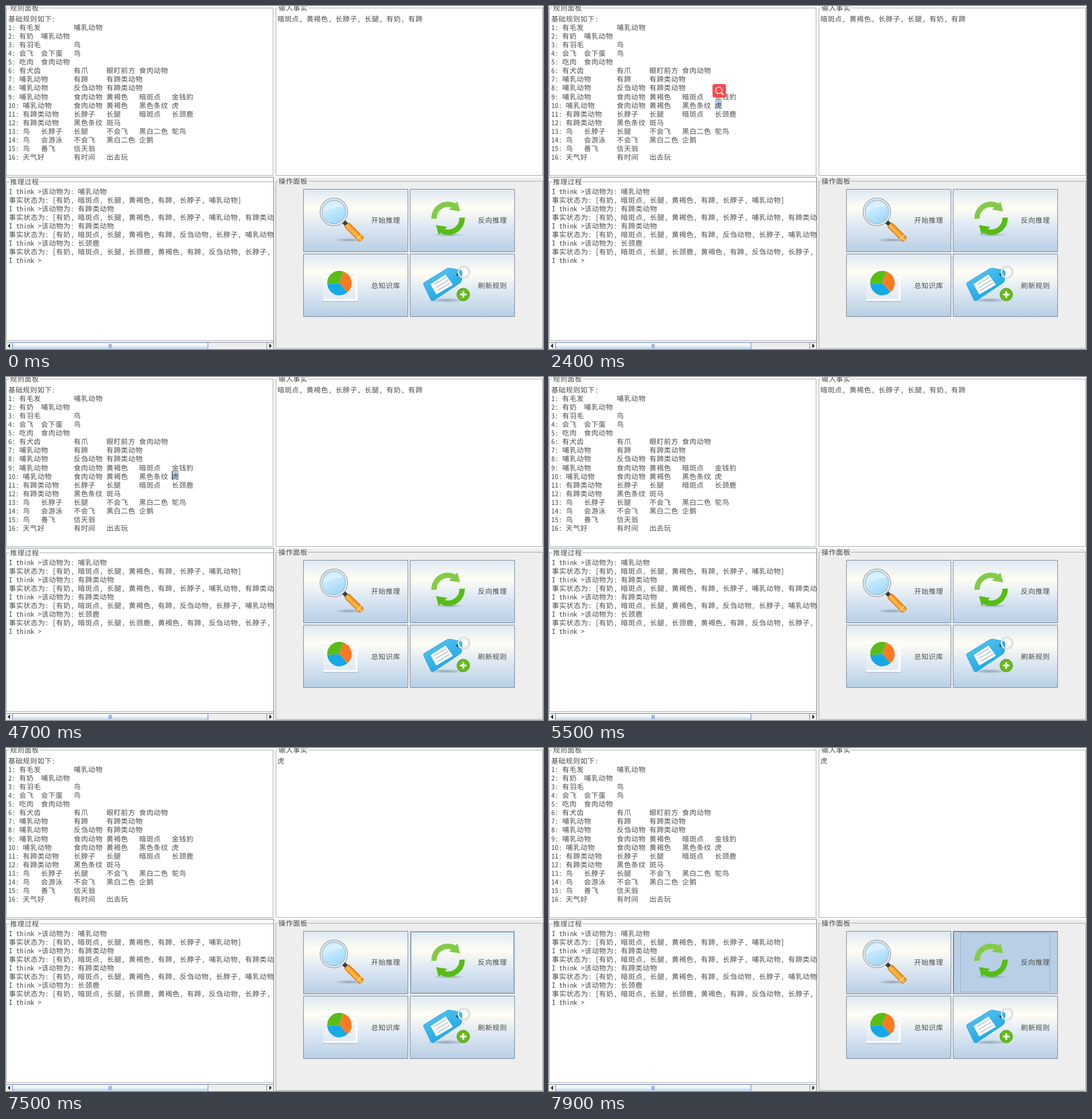
Write an HTML page that moves like this. It is 936x598 px and loops after 8 s.

```html
<!DOCTYPE html>
<html lang="zh-CN">
<head>
<meta charset="utf-8">
<title>动物识别推理</title>
<style>
  html, body { margin: 0; width: 100%; height: 100%; overflow: hidden; background: #fff; }
  svg { display: block; }
  text {
    font: 12.2px "Noto Sans Mono CJK SC", "Noto Sans CJK SC", "Noto Sans CJK", "Noto Sans Mono", monospace;
    fill: #4c4c4c; white-space: pre; text-rendering: geometricPrecision;
  }
  .frame { fill: none; stroke: #a8a8a8; }
  .edge { fill: none; stroke: #7a8a99; }
  .sel { fill: #b8cfe5; }
  .caret { fill: #333; }

  /* 1.25% of the loop is 100 ms */
  .timed { opacity: 0; animation: 8s step-end infinite; }
  #caretEnd { animation-name: caretEnd; }
  #caretSel { animation-name: caretSel; }
  #ruleSel { animation-name: ruleSel; }
  #popup { animation-name: popup; }
  #caretOld { animation-name: caretOld; }
  #inputSel { animation-name: inputSel; }
  #oldFacts { animation-name: oldFacts; }
  #newFacts { animation-name: newFacts; }
  #caretNew { animation-name: caretNew; }
  #hover { animation-name: hover; }
  #pressed { animation-name: pressed; }

  @keyframes caretEnd { 0% { opacity: 0 } 15% { opacity: 1 } 21.25% { opacity: 0 } }
  @keyframes ruleSel { 0% { opacity: 0 } 25% { opacity: 1 } 62.5% { opacity: 0 } }
  @keyframes caretSel {
    0%, 30%, 41.25%, 52.5%, 62.5% { opacity: 0 }
    25%, 36.25%, 47.5%, 58.75% { opacity: 1 }
  }
  @keyframes popup {
    0% { opacity: 0 } 30% { opacity: .96 } 33.75% { opacity: .91 } 37.5% { opacity: .83 }
    41.25% { opacity: .76 } 43.75% { opacity: .69 } 47.5% { opacity: .61 }
    51.25% { opacity: .54 } 58.75% { opacity: 0 }
  }
  @keyframes caretOld { 0% { opacity: 0 } 62.5% { opacity: 1 } 68.75% { opacity: 0 } }
  @keyframes inputSel { 0% { opacity: 0 } 72.5% { opacity: 1 } 75% { opacity: 0 } }
  @keyframes oldFacts { 0% { opacity: 1 } 75% { opacity: 0 } }
  @keyframes newFacts { 0% { opacity: 0 } 75% { opacity: 1 } }
  @keyframes caretNew {
    0%, 80%, 92.5%, 98.75% { opacity: 0 }
    75%, 86.25%, 97.5% { opacity: 1 }
  }
  @keyframes hover { 0% { opacity: 0 } 93.75% { opacity: 1 } 98.75% { opacity: 0 } }
  @keyframes pressed { 0% { opacity: 0 } 98.75% { opacity: 1 } }
</style>
</head>
<body>
<svg width="936" height="598" viewBox="0 0 936 598">
  <defs>
    <linearGradient id="ocean" x2="0" y2="1">
      <stop stop-color="#dde8f3"/><stop offset=".3" stop-color="#fffdf4"/>
      <stop offset=".6" stop-color="#dde8f3"/><stop offset="1" stop-color="#b8cfe5"/>
    </linearGradient>
    <linearGradient id="glass" x2=".5" y2="1">
      <stop stop-color="#a9dcfa"/><stop offset=".5" stop-color="#c5e9fd"/><stop offset="1" stop-color="#9fd8f8"/>
    </linearGradient>
    <linearGradient id="orange" x2="1" y2="0">
      <stop stop-color="#f08a12"/><stop offset=".4" stop-color="#ffc052"/><stop offset="1" stop-color="#ee7d08"/>
    </linearGradient>
    <linearGradient id="tagBlue" x2=".6" y2="1">
      <stop stop-color="#5cc9f5"/><stop offset="1" stop-color="#1ba3e2"/>
    </linearGradient>
    <radialGradient id="shade">
      <stop stop-color="#56687a" stop-opacity=".5"/><stop offset="1" stop-color="#56687a" stop-opacity="0"/>
    </radialGradient>
    <clipPath id="logClip"><path d="M0 300H466V583H0z"/></clipPath>
    <g id="button">
      <path fill="url(#ocean)" d="M0 0H182V109H0z"/>
      <path class="edge" d="M.5 .5H182.5V109.5H.5z"/>
    </g>
    <g id="arrow">
      <path d="M746 371A24.5 24.5 0 0 1 781 348" fill="none" stroke-width="9.5"/>
      <path d="M787 341L791.5 358L772 355z" stroke="none"/>
    </g>
  </defs>

  <!-- panels -->
  <path fill="#eee" d="M467 299H936V598H467z"/>
  <path class="frame" d="M6 3.5H.5V295.5H465.5V3.5H58M474 3.5H470.5V295.5H935.5V3.5H526"/>
  <path class="frame" d="M6 306.5H.5V583.5H466M58 306.5H466M474 305.5H470.5V597H935.5V305.5H526"/>

  <!-- scroll bar -->
  <path fill="#eee" d="M0 586H466V598H0z"/>
  <path class="edge" d="M0 586.5H466M454.5 587V598M0 298.5H466.5V598"/>
  <path fill="url(#ocean)" stroke="#6382bf" d="M11.5 586.5H352V599H11.5z"/>
  <path stroke="#6382bf" d="M179.5 589V596M181.5 589V596M183.5 589V596"/>
  <path fill="#222" d="M3 592.5L7 588.5V596.5zM463 592.5L459 588.5V596.5z"/>

  <!-- highlights -->
  <path class="sel timed" id="ruleSel" d="M289 164H301.5V179H289z"/>
  <path class="sel timed" id="inputSel" d="M473 13H727V29H473z"/>

  <g id="texts"></g>
  <g id="log" clip-path="url(#logClip)"></g>
  <g class="timed" id="oldFacts"></g>
  <g class="timed" id="newFacts"></g>

  <path class="caret timed" id="caretEnd" d="M301 164h1v15h-1z"/>
  <path class="caret timed" id="caretSel" d="M289 164h1v15h-1z"/>
  <path class="caret timed" id="caretOld" d="M726 13h1v16h-1z"/>
  <path class="caret timed" id="caretNew" d="M485 13h1v16h-1z"/>

  <g class="timed" id="popup">
    <rect x="285" y="136" width="23.5" height="23.5" rx="3.5" fill="#f94548"/>
    <path d="M300 151L303.5 154.5" stroke="#fff" stroke-width="2" stroke-linecap="round"/>
    <circle cx="296" cy="147" r="5.6" fill="none" stroke="#fff" stroke-width="1.4"/>
  </g>

  <!-- buttons -->
  <use href="#button" x="518" y="319"/>
  <use href="#button" x="704" y="319"/>
  <use href="#button" x="518" y="432"/>
  <use href="#button" x="704" y="432"/>
  <g class="timed" id="hover">
    <path fill="none" stroke="#b8cfe5" stroke-width="3" d="M705.5 320.5H885.5V427.5H705.5z"/>
    <path class="edge" d="M705.5 320.5H885.5V427.5H705.5z"/>
  </g>
  <g class="timed" id="pressed">
    <path fill="#b8cfe5" stroke="#7a8a99" d="M704.5 319.5H886.5V428.5H704.5z"/>
    <path class="edge" d="M705.5 428V320.5H886"/>
    <path fill="none" stroke="#9db2c8" d="M717.5 322.5H873.5V425.5H717.5z"/>
  </g>

  <!-- magnifier -->
  <ellipse cx="598" cy="408" rx="27" ry="3.5" fill="url(#shade)"/>
  <g transform="translate(571.5 359) rotate(-45)">
    <rect x="-3.5" y="24" width="7" height="9" fill="#3c3c3c"/>
    <rect x="-5.5" y="31" width="11" height="38" rx="3" fill="url(#orange)" stroke="#c96c0a" stroke-width=".8"/>
    <path d="M-5.5 62H5.5" stroke="#ffe2a8" stroke-width="1.5"/>
  </g>
  <circle cx="571.5" cy="359" r="22.5" fill="url(#glass)" stroke="#8d959c" stroke-width="4.4"/>
  <circle cx="571.5" cy="359" r="22.3" fill="none" stroke="#e4e9ed" stroke-width="2.8"/>
  <path d="M553 360A18.5 18.5 0 0 1 587 349Q570 350 553 360z" fill="#fff" opacity=".4"/>

  <!-- refresh -->
  <ellipse cx="772" cy="399" rx="28" ry="3" fill="url(#shade)"/>
  <use href="#arrow" fill="#83cb48" stroke="#83cb48"/>
  <use href="#arrow" fill="#56bd14" stroke="#56bd14" transform="rotate(180 770.5 370)"/>

  <!-- pie chart -->
  <path d="M552 515H614" stroke="#8fa3b5" stroke-width="1.5" opacity=".6"/>
  <path fill="#fff" fill-opacity=".35" d="M553 458H613V514H553z"/>
  <path d="M553 467.5H610M553 476.5H610M553 485.5H610M553 494.5H610M553 503.5H610" stroke="#cfd8e0" opacity=".5"/>
  <path d="M611 460V512.5H553" fill="none" stroke="#fafcfd" stroke-width="3.5"/>
  <path fill="#59bd16" d="M581 483L560 485A21 21 0 0 1 588 463z"/>
  <path fill="#fd7a22" d="M581 483L588 463A21 21 0 0 1 595 499z"/>
  <path fill="#15a9e6" d="M581 483L595 499A21 21 0 0 1 560 485z"/>

  <!-- tag -->
  <ellipse cx="768" cy="513" rx="34" ry="4" fill="url(#shade)"/>
  <path fill="url(#tagBlue)" stroke="#1c9bd6" stroke-width=".8" stroke-linejoin="round"
    d="M729 482L768 458Q771 456.5 774 457L792 460.5Q795 461.5 795 465L794 478Q793.5 481 791 483L746 513Q742 515.5 740 511L728 486Q727 483.5 729 482z"/>
  <path fill="#fdfeff" d="M740 485L766 468L779 486L750 503z"/>
  <path d="M746 486L767 473.5M749 491L771 478M752 496L774 483" stroke="#b7c3cd" stroke-width="1.5"/>
  <circle cx="787.5" cy="468" r="2.5" fill="#30475a"/>
  <circle cx="798" cy="464" r="9.5" fill="none" stroke="#a9b3bb" stroke-width="3"/>
  <circle cx="798" cy="464" r="9.5" fill="none" stroke="#f3f6f8" stroke-width="1.8"/>
  <circle cx="797" cy="503" r="11" fill="#69b91d" stroke="#4f9c0f"/>
  <path d="M797 497.5V508.5M791.5 503H802.5" stroke="#fff" stroke-width="3.2"/>

  <g id="labels"></g>
</svg>

<script>
  const CELL = 12.67, TAB = 57, ROW = 15.06;
  const rules = `基础规则如下:
1: 有毛发|哺乳动物
2: 有奶|哺乳动物
3: 有羽毛|鸟
4: 会飞|会下蛋|鸟
5: 吃肉|食肉动物
6: 有犬齿|有爪|眼盯前方|食肉动物
7: 哺乳动物|有蹄|有蹄类动物
8: 哺乳动物|反刍动物|有蹄类动物
9: 哺乳动物|食肉动物|黄褐色|暗斑点|金钱豹
10: 哺乳动物|食肉动物|黄褐色|黑色条纹|虎
11: 有蹄类动物|长脖子|长腿|暗斑点|长颈鹿
12: 有蹄类动物|黑色条纹|斑马
13: 鸟|长脖子|长腿|不会飞|黑白二色|鸵鸟
14: 鸟|会游泳|不会飞|黑白二色|企鹅
15: 鸟|善飞|信天翁
16: 天气好|有时间|出去玩`;

  const log = `I think >该动物为: 哺乳动物
事实状态为: [有奶, 暗斑点, 长腿, 黄褐色, 有蹄, 长脖子, 哺乳动物]
I think >该动物为: 有蹄类动物
事实状态为: [有奶, 暗斑点, 长腿, 黄褐色, 有蹄, 长脖子, 哺乳动物, 有蹄类动物]
I think >该动物为: 有蹄类动物
事实状态为: [有奶, 暗斑点, 长腿, 黄褐色, 有蹄, 反刍动物, 长脖子, 哺乳动物]
I think >该动物为: 长颈鹿
事实状态为: [有奶, 暗斑点, 长腿, 长颈鹿, 黄褐色, 有蹄, 反刍动物, 长脖子, 哺乳动物]
I think >`;

  // Sets one line on the half/full-width grid; "|" jumps to the next tab stop.
  function put(parent, x, mid, line) {
    let dx = 0;
    const xs = [...line].map(c => {
      const at = (x + dx).toFixed(2);
      if (c === '|') dx = (Math.floor(dx / TAB) + 1) * TAB;
      else dx += c < '\x7f' ? CELL / 2 : CELL;
      return at;
    });
    const el = document.createElementNS('http://www.w3.org/2000/svg', 'text');
    el.setAttribute('x', xs.join(' '));
    el.setAttribute('y', mid + 4.5);
    el.textContent = line.replace(/\|/g, ' ');
    document.getElementById(parent).append(el);
  }

  const block = (parent, x, mid, lines) =>
    lines.split('\n').forEach((line, i) => put(parent, x, mid + i * ROW, line));

  block('texts', 4, 22.5, rules);
  block('log', 5, 323, log);
  put('texts', 7, 3.5, '规则面板');
  put('texts', 475, 3.5, '输入事实');
  put('texts', 7, 306, '推理过程');
  put('texts', 475, 305.5, '操作面板');
  put('oldFacts', 473, 22.5, '暗斑点, 黄褐色, 长脖子, 长腿, 有奶, 有蹄');
  put('newFacts', 473, 22.5, '虎');
  put('labels', 636.5, 373.5, '开始推理');
  put('labels', 822.5, 373.5, '反向推理');
  put('labels', 636.5, 487, '总知识库');
  put('labels', 822.5, 487, '刷新规则');
</script>
</body>
</html>
```
